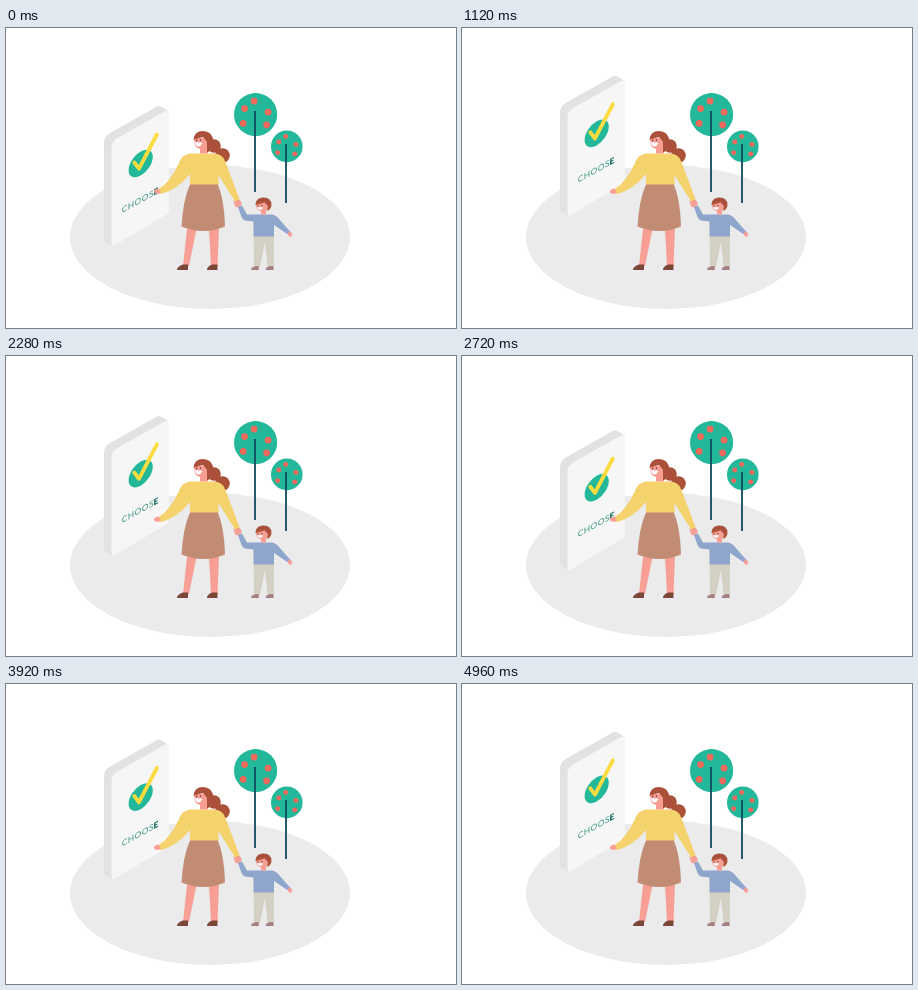
An HTML page that plays this animation: 450 px wide and 300 px high, repeating every 5 s.

```html
<!DOCTYPE html>
<html lang="en">
<head>
<meta charset="utf-8">
<title>Choose</title>
<style>
  html, body { margin: 0; width: 100%; height: 100%; overflow: hidden; background: #fff; }
  svg { display: block; width: 100vw; height: 100vh; }
  text { font: 500 8.4px Lato, sans-serif; }
  .teal { fill: #22b899; }
  .fruit { fill: #f0695c; }
  .trunk { stroke: #0f4c5f; stroke-width: 1.8; }
  .skin { fill: #f79f94; }
  .hair { fill: #ab5039; }
  .shoe { fill: #7b4738; }
  .sweater { fill: #f4d26c; }
  .shirt { fill: #8ea6cb; }
  .trousers { fill: #d4d0c3; }
  .smallShoe { fill: #a37f83; }
</style>
</head>
<body>
<svg viewBox="0 0 450 300">
  <ellipse cx="204" cy="209" rx="140" ry="72" fill="#ebebeb"/>

  <g id="panel">
    <path fill="#e2e2e2" d="M98 211V115Q98 108.500 104 105L151 78.500Q153 77.500 155 78.500L162.500 83L150 150L106.500 217.500L99.500 214Q98 213 98 211Z"/>
    <path fill="#f6f6f6" d="M105.500 215V120Q105.500 113.500 111 110.300L159.500 83Q163 81.300 163 85V182Q163 185 160.500 186.500L109 217Q105.500 219 105.500 215Z"/>
    <circle class="teal" r="12.100" transform="translate(134.700 135.500) skewY(-29)"/>
    <path d="M128.300 134.500L133 140.700L150.800 106.500" fill="none" stroke="#fddc3f" stroke-width="3.800" stroke-linecap="round" stroke-linejoin="round"/>
    <g transform="translate(115.800 185.300) skewY(-29)">
      <text fill="#4b9d8c" letter-spacing=".4">CHOOS</text>
      <text x="31.800" fill="#176c60" style="font-weight:900">E</text>
    </g>
  </g>

  <g id="trees"></g>

  <g id="woman">
    <circle class="hair" cx="208" cy="118" r="6.800"/>
    <circle class="hair" cx="216.500" cy="127.500" r="7.300"/>
    <path class="skin" d="M181 201H190.500L183 238H177ZM203 201H213L211.500 238H205Z"/>
    <path class="shoe" d="M171 242Q171 238.500 177 236.500H182V242ZM201 242Q201 238.500 206 236.500H211.500V242Z"/>
    <path class="skin" d="M156 160.500Q150 160 148 162.500Q147.500 165 150 165.500Q154 166.500 157 164Z"/>
    <path class="skin" d="M227.500 173L232.500 171Q236 173 235.500 177Q233 180.500 229 178.500Z"/>
    <path class="sweater" d="M184 125.500H208Q216 125.500 219 133L233.500 171L229 173.500L212.500 147V157H184V146Q171 162 155 166L153 161Q164 154 172 137Q176 126 184 125.500Z"/>
    <path fill="#c18b74" d="M184 156.500H212Q218.500 173 219 198.500Q197 207.500 175.500 198.500Q177 172 184 156.500Z"/>
    <path class="skin" d="M194 117H201.500V125.500H194Z"/>
    <path class="skin" d="M188.500 110H203V115Q202 121 195 121Q188.500 120.500 188.500 114Z"/>
    <path class="hair" d="M187.500 112Q188 103 197 103Q206 103 207.500 113Q207 121 201 125V114Q199 111 197 109Q192 110 187.500 112Z"/>
    <path fill="#fff" d="M189 114.500H196Q195.500 118.500 192 118.500Q189.500 118 189 114.500Z"/>
    <circle cx="190.500" cy="112.500" r=".7" fill="#4a2c2a"/>
    <circle cx="194.500" cy="112.300" r=".7" fill="#4a2c2a"/>
  </g>

  <g id="boy">
    <path class="trousers" d="M247.500 207H268V239H261.500L259 213.500L254 239H248Z"/>
    <path class="smallShoe" d="M245 242Q245 239.500 249 238.300H252.800V242ZM259.500 242Q259.500 239.500 263 238.300H267.500V242Z"/>
    <path class="shirt" d="M232 179L236 177.500L241 186.500H266Q270 187 273 191L284.500 204L282 206.500L268 197V208.500H247.500V193.500L239 192.500Q236.500 192 235.500 189Z"/>
    <path class="skin" d="M281.500 205.500L284 203.500Q287 205.500 285.500 208.500Q283 210 281.500 205.500Z"/>
    <path class="skin" d="M255 181H260V186.500H255Z"/>
    <path class="skin" d="M250 175H263V178Q262 183.500 256.500 183.500Q250.500 183 250 178Z"/>
    <path class="hair" d="M249.500 177Q249.500 169.500 257.500 169.500Q265.500 169.500 265.500 177Q265 181.500 261 183L262 178Q260 176 258.500 174.500Q254 175.500 249.500 177Z"/>
    <path fill="#fff" d="M251 179.300H257Q256.500 182 254 182Q251.500 182 251 179.300Z"/>
    <circle cx="252" cy="177.800" r=".6" fill="#4a2c2a"/>
    <circle cx="255.800" cy="177.600" r=".6" fill="#4a2c2a"/>
  </g>
</svg>
<script>
  const LOOP = 5000, BOB = 3040, LIFT = 36;
  const panel = document.getElementById('panel');
  const fruits = [[-1.5, -13.5], [-11, -6], [12.5, -2.5], [-12.5, 8.7], [11, 10.3]];

  function tree(x, y, r, trunkX, top, bottom) {
    const k = r / 21.6;
    const dots = fruits.map(([dx, dy]) =>
      `<circle class="fruit" cx="${x + dx * k}" cy="${y + dy * k}" r="${3.4 * k}"/>`).join('');
    return `<circle class="teal" cx="${x}" cy="${y}" r="${r}"/>${dots}` +
      `<path class="trunk" d="M${trunkX} ${top}V${bottom}"/>`;
  }

  document.getElementById('trees').innerHTML =
    tree(249.6, 86.6, 21.6, 249, 83, 164) + tree(280.8, 118.4, 15.8, 280, 116, 175);

  function draw() {
    const t = performance.now() % LOOP;
    const y = -LIFT * (1 - Math.cos(2 * Math.PI * t / BOB)) / 2;
    panel.setAttribute('transform', `translate(0 ${y})`);
    requestAnimationFrame(draw);
  }
  draw();
</script>
</body>
</html>
```
